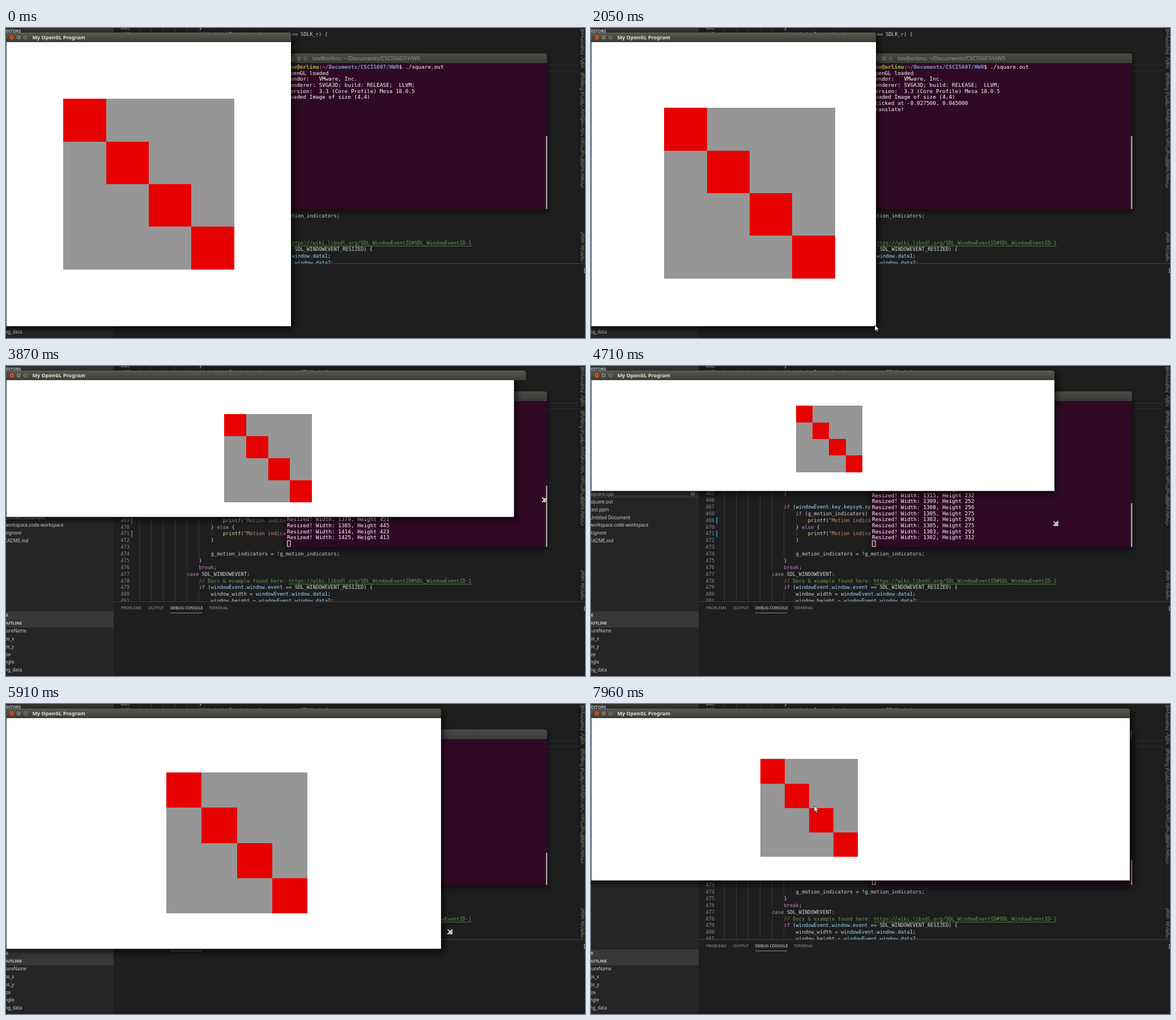
Animation, 1022 px wide and 548 px high, one loop 8000 ms. Source, as an HTML page:

```html
<!DOCTYPE html>
<html lang="en">
<head>
<meta charset="utf-8">
<title>Square</title>
<style>
  html, body { margin: 0; width: 100%; height: 100%; overflow: hidden; background: #1e1e1e; }
  svg { display: block; width: 100%; height: 100%; }
  text { white-space: pre; font-family: "Noto Sans", "Open Sans", sans-serif; }
  .code text { font: 8.79px "DejaVu Sans Mono", monospace; fill: #d4d4d4; }
  .code .num { fill: #858585; text-anchor: end; }
  .side text { font-size: 8px; fill: #ccc; }
  .side .head { font-size: 7.2px; font-weight: 700; }
  .tabs text { font-size: 7px; fill: #969696; }
  .term text { font: 9.4px "DejaVu Sans Mono", monospace; fill: #fff; }
  .title { font-size: 9.05px; font-weight: 700; fill: #e4e0d8; }
  .dim { font-size: 9.8px; font-weight: 500; fill: #99968d; }
</style>
</head>
<body>
<svg viewBox="0 0 1022 548">
  <defs>
    <linearGradient id="bar" x2="0" y2="1">
      <stop offset="0" stop-color="#5b5951"/><stop offset="1" stop-color="#3c3b37"/>
    </linearGradient>
    <linearGradient id="barDim" x2="0" y2="1">
      <stop offset="0" stop-color="#4b4a45"/><stop offset="1" stop-color="#3c3b37"/>
    </linearGradient>
    <filter id="blur" filterUnits="userSpaceOnUse" x="-30" y="-30" width="1082" height="608">
      <feGaussianBlur stdDeviation="6"/>
    </filter>
  </defs>
  <rect width="1022" height="548" fill="#1e1e1e"/>
  <g id="editor" class="code"></g>
  <g id="minimap"></g>
  <g id="sidebar" class="side"></g>
  <g id="panel" class="tabs"></g>
  <g id="terminal">
    <rect x="494" y="49" width="462" height="276" fill="#000" opacity=".55" filter="url(#blur)"/>
    <path d="M494 62V49q0-4 4-4H951q4 0 4 4V62z" fill="url(#barDim)"/>
    <rect x="494" y="62" width="461" height="258" fill="#300a24"/>
    <text class="dim" x="541" y="57.3">tov@orlinu: ~/Documents/CSCI5607/HW0</text>
    <g id="termButtons"></g>
    <g id="rows" class="term"></g>
    <rect id="caret" x="496.5" width="5.5" height="10" fill="none" stroke="#fff"/>
    <rect id="thumb" x="953" width="2.5" rx="1" fill="#a39ba0"/>
  </g>
  <g id="glWindow">
    <rect id="shadow" x="-4" y="13" fill="#000" opacity=".75" filter="url(#blur)"/>
    <path id="titleBar" fill="url(#bar)"/>
    <rect id="frame" y="25" fill="#3c3b37"/>
    <rect id="canvas" x="1" y="25" fill="#fff"/>
    <g id="glButtons"></g>
    <text class="title" x="46.5" y="20">My OpenGL Program</text>
    <g id="square" shape-rendering="crispEdges">
      <rect width="4" height="4" fill="#969696"/>
      <path d="M0 0h1v1h1v1h1v1h1v1h-1v-1h-1v-1h-1v-1h-1z" fill="#e60000"/>
    </g>
  </g>
  <path id="arrow" d="M0 0V10.6L2.5 8.4 4.2 12.2 6 11.4 4.3 7.7H7.6Z" fill="#fff" stroke="#222" stroke-width=".8"/>
  <g id="resizer" fill="none">
    <path d="M-4 4.2H4.2V-4M-3.5-3.5L2 2M2-2.4V2H-2.4" stroke="#111" stroke-width="3"/>
    <path d="M-4 4.2H4.2V-4M-3.5-3.5L2 2M2-2.4V2H-2.4" stroke="#fff" stroke-width="1.5"/>
  </g>
</svg>
<script>
const LOOP = 8000, SCALE = 0.6275, TOP = 25;
const PRESS1 = 890, DROP1 = 1300, GRAB = 2350, RELEASE = 6740, PRESS2 = 7180;

const $ = id => document.getElementById(id);
const set = (el, attrs) => { for (const k in attrs) el.setAttribute(k, attrs[k]); };
const show = (el, on) => set(el, { visibility: on ? 'visible' : 'hidden' });
const escape = s => s.replace(/&/g, '&amp;').replace(/</g, '&lt;');
const label = (x, y, s, cls = '') => `<text class="${cls}" x="${x}" y="${y}">${s}</text>`;
const box = (x, y, w, h, fill) => `<rect x="${x}" y="${y}" width="${w}" height="${h}" fill="${fill}"/>`;
const clamp = (v, lo, hi) => Math.min(hi, Math.max(lo, v));

// Each key is [time, a, b]; the curve is smooth and never overshoots a key.
function track(keys, t) {
  t = clamp(t, keys[0][0], keys.at(-1)[0]);
  let i = 0;
  while (i < keys.length - 2 && t > keys[i + 1][0]) i++;
  const rate = (j, d) => (keys[j + 1][d] - keys[j][d]) / (keys[j + 1][0] - keys[j][0]);
  const slope = (j, d) => {
    if (j === 0 || j === keys.length - 1) return 0;
    const a = rate(j - 1, d), b = rate(j, d);
    return a * b > 0 ? 2 * a * b / (a + b) : 0;
  };
  const span = keys[i + 1][0] - keys[i][0], u = (t - keys[i][0]) / span, v = 1 - u;
  return [1, 2].map(d =>
    keys[i][d] * v * v * (1 + 2 * u) + keys[i + 1][d] * u * u * (3 - 2 * u) +
    span * (slope(i, d) * u * v * v - slope(i + 1, d) * u * u * v));
}

const sizeKeys = [
  [3050, 800, 800], [3300, 1000, 700], [3750, 1379, 451], [3785, 1385, 445], [3820, 1414, 423],
  [3855, 1425, 413], [3870, 1425, 413], [3900, 1427, 386], [3930, 1460, 360], [4020, 1512, 336],
  [4200, 1500, 225], [4340, 1390, 205], [4445, 1315, 232], [4480, 1309, 252], [4515, 1308, 256],
  [4550, 1305, 275], [4585, 1303, 293], [4620, 1305, 275], [4655, 1303, 293], [4690, 1302, 312],
  [4740, 1302, 312], [4860, 1305, 402], [5100, 1230, 560], [5380, 1180, 685], [5600, 1165, 725],
  [5910, 1222, 661], [5940, 1222, 650], [6060, 1246, 601], [6210, 1330, 590], [6450, 1460, 500],
  [6640, 1514, 457]
];
const pointerKeys = [
  [30, 829, 519], [820, 263, 282], [PRESS1, 245, 265], [1030, 257, 248], [1180, 290, 265],
  [DROP1, 273, 281], [1640, 520, 535], [1780, 515, 533], [1950, 498, 522], [2050, 501, 525],
  [2250, 501, 525], [GRAB, 503, 527], [RELEASE, 951, 312], [6900, 743, 251], [PRESS2, 501, 174],
  [7400, 384, 190], [7470, 376, 194], [7660, 405, 122], [7730, 430, 114], [7820, 455, 122],
  [7880, 439, 138], [7960, 394, 180]
];
const appSize = t => track(sizeKeys, t);
const corner = t => { const [w, h] = appSize(t); return [1 + w * SCALE, TOP + h * SCALE]; };
const resizing = t => t >= GRAB && t < RELEASE;
const pointer = t => resizing(t) ? corner(t + 150) : track(pointerKeys, t);
function dragged(t, from, to) {
  const a = track(pointerKeys, from), b = track(pointerKeys, clamp(t, from, to));
  return [b[0] - a[0], b[1] - a[1]];
}

// Terminal output with the time each line is printed
const bold = (color, s) => `<tspan font-weight="700" fill="${color}">${s}</tspan>`;
const log = [
  bold('#8ae234', 'tov@orlinu') + ':' + bold('#729fcf', '~/Documents/CSCI5607/HW0') + '$ ./square.out',
  'OpenGL loaded', 'Vendor:   VMware, Inc.', 'Renderer: SVGA3D; build: RELEASE;  LLVM;',
  'Version:  3.3 (Core Profile) Mesa 18.0.5', 'Loaded Image of size (4,4)'
].map(text => ({ at: 0, text }));
const click = (at, x, y) => log.push({ at, text: `Clicked at ${x}, ${y}` }, { at, text: 'Translate!' });
click(PRESS1, '-0.027500', '0.045000');
for (const [start, step, count] of [[3050, 35, 24], [3920, 35, 23], [4730, 42, 28], [5920, 28, 30]])
  for (let i = 0; i < count; i++) {
    const at = start + i * step, [w, h] = appSize(at).map(Math.round);
    log.push({ at, text: `Resized! Width: ${w}, Height ${h}` });
  }
click(PRESS2, '0.174216', '0.038328');

const ROWS = 24, PITCH = 10.65, rowY = i => 72 + i * PITCH;
$('rows').innerHTML = Array.from({ length: ROWS }, (_, i) => label(496, rowY(i), '')).join('');
let printed = -1;
function drawTerminal(t) {
  const count = log.filter(l => l.at <= t).length;
  if (count === printed) return;
  printed = count;
  const scrolled = Math.max(0, count + 1 - ROWS);
  [...$('rows').children].forEach((row, i) => {
    const n = i + scrolled;
    row.innerHTML = n < count ? log[n].text : '';
  });
  set($('caret'), { y: rowY(count - scrolled) - 8 });
  const height = 258 * ROWS / (2 * ROWS + scrolled);
  set($('thumb'), { y: 320 - height, height });
}

function buildEditor() {
  const LINE = 11.875, FIRST = 446, COL = 5.292, LEFT = 234.6;
  const lines = {
    446: [20, '}'],
    447: [20, 'if (windowEvent.key.keysym.sym == SDLK_r) {'],
    455: [24, 'g_scale = 1.0f;'], 456: [20, '}'],
    458: [20, 'if (windowEvent.key.keysym.sym == SDLK_f) {'],
    459: [24, 'fullscreen = !fullscreen;'],
    460: [24, 'if (fullscreen) {'], 461: [28, 'setFullscreen(window);'],
    462: [24, '} else {'], 463: [28, 'setWindowed(window);'], 464: [24, '}'], 465: [20, '}'],
    467: [20, 'if (windowEvent.key.keysym.sym == SDLK_m) {'],
    468: [24, 'if (g_motion_indicators) {'],
    469: [28, 'printf("Motion indicators OFF\\n");'],
    470: [24, '} else {'],
    471: [28, 'printf("Motion indicators ON\\n");'],
    472: [24, '}'],
    474: [24, 'g_motion_indicators = !g_motion_indicators;'],
    475: [20, '}'], 476: [20, 'break;'], 477: [16, 'case SDL_WINDOWEVENT:'],
    478: [20, '// Docs & example found here: https://wiki.libsdl.org/SDL_WindowEventID#SDL_WindowEventID-1'],
    479: [20, 'if (windowEvent.window.event == SDL_WINDOWEVENT_RESIZED) {'],
    480: [24, 'window_width = windowEvent.window.data1;'],
    481: [24, 'window_height = windowEvent.window.data2;']
  };
  const tint = (color, s) => `<tspan fill="${color}">${s}</tspan>`;
  const paint = s => s.startsWith('//') ? tint('#6a9955', escape(s)) :
    escape(s).replace(/("[^"]*")|\b(if|else|case|break)\b|\b(windowEvent|window|event|key|keysym|sym|data\d)\b|\b(\w+)(?=\()/g,
      (m, str, word, name) => tint(str ? '#ce9178' : word ? '#c586c0' : name ? '#9cdcfe' : '#dcdcaa', m));
  let out = box(190, 65, 822, 1, '#303030') + box(190, 75, 822, 1, '#303030');
  let depth = 16;
  for (let n = FIRST; n <= 481; n++) {
    const y = 272.5 + (n - 469) * LINE, line = lines[n];
    depth = line ? line[0] : Math.max(depth, 20);
    for (let c = 0; c < depth; c += 4) out += box(Math.round(LEFT + c * COL), y - 6, 1, LINE + .2, '#383838');
    out += label(218, y + 3.2, n, 'num');
    if (line) out += label(LEFT + line[0] * COL, y + 3.2, paint(line[1]));
  }
  out += box(499, 385, 323, 1, '#56793f') + box(221, 267, 2, 12, '#1b81a8') + box(221, 290.5, 2, 12, '#1b81a8');
  $('editor').innerHTML = out;
}

function buildMinimap() {
  let seed = 7, out = box(1011, 0, 1, 416, '#151515');
  const random = () => (seed = seed * 16807 % 2147483647) / 2147483647;
  for (const [from, to] of [[2, 46], [51, 72], [79, 110], [113, 190], [194, 282], [361, 380], [384, 414]])
    for (let y = from; y < to; y += 1.5) {
      const x = 1013 + random() * 4;
      out += box(x, y, (1022 - x) * (.3 + random() * .7), .9, random() < .15 ? '#75664c' : '#646464');
    }
  $('minimap').innerHTML = out + box(1012, 107, 2, 2, '#1b81a8');
}

function buildSidebar() {
  let out = box(0, 0, 190, 548, '#252526') + box(0, 0, 190, 11, '#333334') + label(0, 7.6, 'DITORS', 'head');
  const list = (names, y) => names.forEach((s, i) => out += label(-2, y + i * 13.78 + 2.9, s));
  out += box(0, 219, 190, 14, '#37373d');
  list(['glad.h', 'glad.c', 'brick.ppm', 'main.cpp', 'pixel.h', 'Square.cpp', 'square.out', 'test.ppm',
    'Untitled Document', 'workspace.code-workspace', 'itignore', 'EADME.md'], 157.4);
  out += label(176, 229.3, 'M') + box(0, 434, 190, 28, '#383838') + box(0, 447, 190, 1, '#303031');
  out += label(0, 443, 'E', 'head') + label(-4, 457, 'OUTLINE', 'head');
  list(['tureName', 'os_x', 'os_y', 'ize', 'ngle', 'ng_data'], 468.4);
  $('sidebar').innerHTML = out;
}

function buildPanel() {
  let out = box(190, 416, 832, 132, '#1e1e1e') + box(190, 416, 832, 1, '#424242');
  [[203, 'PROBLEMS'], [251, 'OUTPUT'], [290, 'DEBUG CONSOLE'], [358, 'TERMINAL']].forEach(([x, s]) =>
    out += `<text x="${x}" y="430" ${x === 290 ? 'style="fill:#e7e7e7"' : ''}>${s}</text>`);
  out += box(290, 436, 56, 1, '#8a8a8a');
  for (const y of [425, 428, 431]) out += box(1020, y, 2, 1.4, '#ccc');
  $('panel').innerHTML = out;
}

function buttons(id, x, y, colors) {
  const marks = ['M-1.6-1.6L1.6 1.6M1.6-1.6L-1.6 1.6', 'M-2 0H2', 'M-1.7-1.7H1.7V1.7H-1.7Z'];
  $(id).innerHTML = marks.map((d, i) => `<g transform="translate(${x + 12 * i} ${y})">
    <circle r="4.4" fill="${colors[i]}" stroke="#302f2b" stroke-width=".7"/>
    <path d="${d}" fill="none" stroke="#3a3833"/></g>`).join('');
}

function drawWindow(t) {
  const [right, bottom] = corner(t + 30);
  const titleRight = t < 4000 ? corner(t + 60)[0] : right;
  set($('titleBar'), { d: `M0 25V12q0-4 4-4H${titleRight - 4}q4 0 4 4V25z` });
  set($('shadow'), { width: right + 8, height: bottom - 8 });
  set($('frame'), { width: right, height: bottom - TOP + .5 });
  set($('canvas'), { width: right - 1, height: bottom - TOP });

  // The picture inside follows the size the program last handled.
  const [w, h] = appSize(t).map(v => v * SCALE);
  const first = dragged(t, PRESS1, DROP1), second = dragged(t, PRESS2, LOOP);
  const size = h * .6, zoom = h / (800 * SCALE);
  const x = 1 + w / 2 + first[0] * zoom + second[0] - size / 2;
  const y = TOP + h / 2 + first[1] * zoom + second[1] - size / 2;
  set($('square'), { transform: `translate(${x} ${y}) scale(${size / 4})` });
}

function drawPointer(t) {
  const [x, y] = pointer(t), grip = resizing(t);
  for (const id of ['arrow', 'resizer']) set($(id), { transform: `translate(${x} ${y})` });
  show($('arrow'), !grip && t >= 30);
  show($('resizer'), grip);
}

function draw(t) {
  drawTerminal(t);
  drawWindow(t);
  drawPointer(t);
}

buildEditor();
buildMinimap();
buildSidebar();
buildPanel();
buttons('termButtons', 505, 54, ['#65635b', '#65635b', '#65635b']);
buttons('glButtons', 10.3, 16.5, ['#e4511f', '#7d7a70', '#7d7a70']);

const start = performance.now();
function tick() {
  draw((performance.now() - start) % LOOP);
  requestAnimationFrame(tick);
}
draw(0);
requestAnimationFrame(tick);
</script>
</body>
</html>
```
